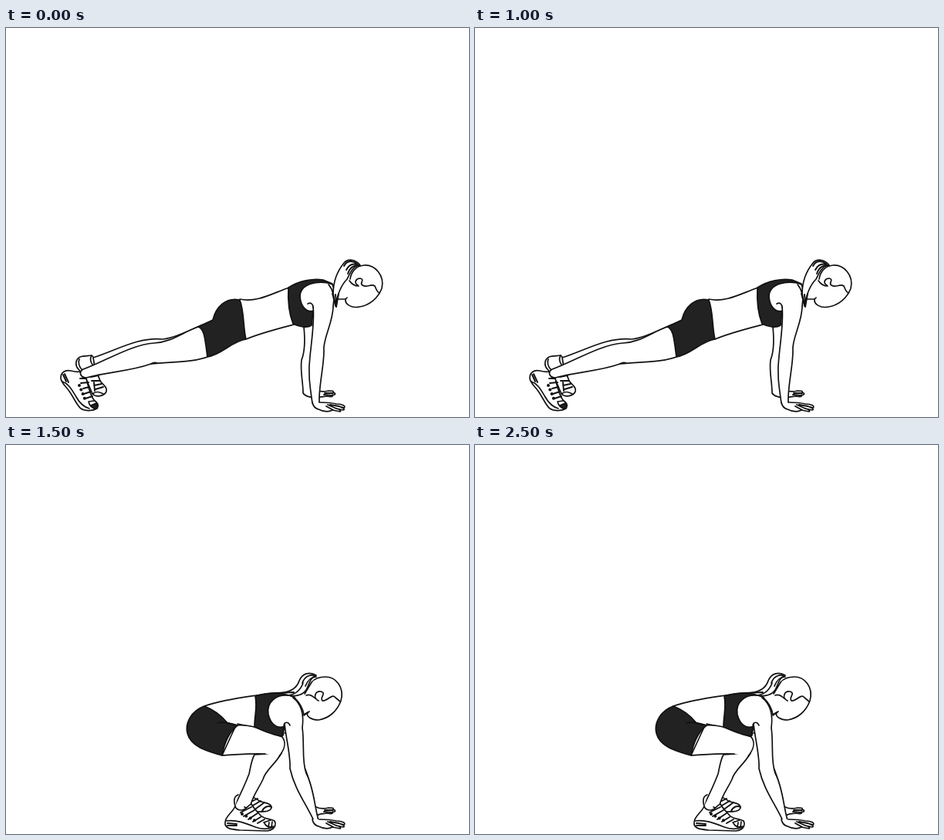
Recreate the animation shown at these times as an HTML page. Size 600 px wide and 505 px high, loop 3000 ms.

```html
<!DOCTYPE html>
<html lang="en">
<head>
<meta charset="utf-8">
<title>Burpee</title>
<style>
  html, body { margin: 0; width: 100%; height: 100%; overflow: hidden; background: #fff; }
  svg { display: block; width: 600px; height: 505px; }
  path { fill: #fff; stroke: #111; stroke-width: 1.7; stroke-linecap: round; stroke-linejoin: round; }
  .k { fill: #222; }
  .l { fill: none; }
  .t { fill: none; stroke-width: 1.9; }
  .dots { fill: none; stroke-width: 4; stroke-dasharray: 0 6; }
  .pose { visibility: hidden; }
</style>
</head>
<body>
<svg viewBox="0 0 600 505">
  <defs>
    <g id="hand">
      <path d="M397 486C398 491 401 494 405 495C411 498 418 499 423 496L433 498C435 497 432 495 428 494L437 496C440 495 437 493 431 491L438 493C441 491 436 488 428 488C420 486 414 486 406 486"/>
      <path class="t" d="M417 489L428 494M420 489L431 491M415 491L424 496"/>
    </g>
    <g id="farHand">
      <path d="M402 470C408 473 414 472 418 471C422 471 425 471 424 473C428 474 427 477 423 476C425 479 421 479 416 478C411 479 406 478 403 481"/>
      <path class="t" d="M413 474L424 474M412 476L422 477"/>
    </g>
    <g id="tiptoe">
      <path d="M84 445C76 443 71 448 71 454C71 461 78 465 83 473C89 482 92 490 97 494C103 498 113 497 118 494C121 489 118 486 114 483C109 477 106 463 104 455C101 455 97 451 96 446C92 447 88 446 84 445Z"/>
      <path class="l" d="M73 459C82 462 86 471 91 479C96 488 101 492 108 494M107 485C108 490 111 493 116 494M107 485L114 484"/>
      <path class="t" d="M74 450L78 459M76 449L81 460M96 455L104 455M97 461L107 460M100 468L108 466M101 475L110 472M103 481L112 478"/>
      <path class="dots" d="M95 464L104 486"/>
      <path class="k" d="M110 490L117 487L119 490L115 495Z"/>
    </g>
    <g id="farTiptoe">
      <path d="M94 443C89 438 90 430 96 427C101 425 107 426 111 425L117 431C116 438 118 449 122 458C125 463 132 466 130 472C127 478 117 480 112 475L104 456Z"/>
      <path class="l" d="M95 430C93 434 95 440 98 443M111 425C108 430 110 434 112 437M112 475C117 471 121 472 126 475"/>
      <path class="t" d="M110 453L120 451M111 458L122 458M114 464L124 462M116 469L126 466M114 460L115 471"/>
    </g>
  </defs>

  <g class="pose" id="plank">
    <use href="#farTiptoe"/>
    <path d="M268 380C243 389 222 402 203 404C171 401 144 418 113 428L115 440L250 400"/>
    <use href="#tiptoe"/>
    <path d="M249 388C229 395 214 408 192 409C162 411 128 433 100 443C94 446 96 454 104 454C133 446 160 446 188 436C212 433 239 435 261 427"/>
    <path class="l" d="M188 436C191 434 193 434 196 435"/>
    <path d="M386 388C388 408 387 421 383 431C381 446 385 459 385 474C388 479 395 480 405 480L408 400"/>
    <use href="#farHand"/>
    <path d="M303 352C325 357 346 344 367 337L373 385C350 391 330 396 311 404"/>
    <path class="k" d="M303 353C285 349 272 362 268 379L249 388C257 390 258 404 261 427C280 424 292 407 311 404C307 388 309 369 303 353Z"/>
    <path d="M367 337C386 327 407 325 423 333C428 344 424 361 421 374L398 386"/>
    <path class="k" d="M366 337C380 328 397 325 411 327L423 332C403 327 381 332 381 349C382 361 389 370 398 367L396 386C390 390 380 388 372 384C367 371 365 354 366 337Z"/>
    <path d="M398 362C400 380 396 406 394 426C391 448 394 466 397 487C400 489 404 488 406 486C405 466 412 440 412 419C410 404 424 383 424 361C426 350 424 340 418 333"/>
    <path class="l" d="M391 358C395 356 398 358 398 363"/>
    <use href="#hand"/>
    <path d="M424 341L430 352L440 352C439 359 448 364 458 362C471 360 482 351 487 338C491 321 478 307 464 308C452 309 447 318 446 326"/>
    <path class="l" d="M445 328C449 334 454 335 457 335M456 334C450 330 454 325 459 325C466 327 457 331 462 334C468 338 473 331 478 335C480 340 481 343 484 344M440 352L442 350"/>
    <path d="M424 345C424 330 429 316 438 305C443 299 453 300 459 308C449 309 446 318 442 326C435 333 430 343 427 361C426 355 425 350 424 345Z"/>
    <path class="t" d="M438 309C442 301 450 302 455 306M441 314C445 306 451 305 458 308M443 319C446 310 451 308 458 308M423 345L428 362L431 345M427 346L428 358"/>
  </g>

  <g class="pose" id="low">
    <use href="#farTiptoe" transform="rotate(10 126 474)"/>
    <path d="M271 430C244 434 224 432 207 427C184 420 151 428 120 429L122 442L270 450"/>
    <use href="#tiptoe" transform="rotate(10 112 491)"/>
    <path d="M271 437C246 440 223 440 210 437C184 427 144 437 106 441C101 444 103 456 110 457C139 462 170 460 198 462C222 471 249 472 275 475"/>
    <path class="l" d="M198 462L205 462"/>
    <path d="M388 429C378 427 373 422 374 415C377 408 386 411 396 414L419 422"/>
    <path d="M336 420C350 428 370 429 388 428L391 475C371 469 349 473 327 469"/>
    <path class="k" d="M271 431L289 429C296 417 310 413 322 414C330 415 335 418 337 420C325 437 329 453 327 469C306 470 297 477 275 475C273 459 276 446 271 431Z"/>
    <path class="l" d="M271 437L288 434C293 432 293 427 300 424"/>
    <path class="k" d="M388 431C398 424 409 421 419 422L450 431L447 463L409 486L391 477C384 466 383 449 385 437Z"/>
    <path d="M397 487C391 473 387 456 388 444C390 435 399 434 412 434C427 429 442 431 449 434L446 462C436 456 425 463 413 459C407 462 404 468 405 485"/>
    <path class="l" d="M415 434C423 433 430 434 434 439M414 459C423 462 434 458 444 465"/>
    <use href="#hand"/>
    <path d="M447 440L447 466L463 466C463 476 478 479 490 475C502 473 512 461 511 449C509 431 494 424 481 429"/>
    <path d="M452 466L463 466C462 462 463 458 466 456"/>
    <path class="l" d="M465 440C471 446 476 445 478 449M480 451C473 448 477 442 484 443C491 446 481 448 485 452C491 456 495 446 501 453C504 457 506 461 509 461"/>
    <path d="M445 464C444 448 454 438 463 427C469 418 477 415 483 418C489 424 485 428 477 430C467 434 464 443 456 448C450 454 451 465 447 476C445 473 447 469 445 464Z"/>
    <path class="t" d="M464 430C470 421 477 419 483 420M465 435C471 427 479 424 485 425M466 439C471 433 477 429 485 426M445 460L447 476L452 460M420 422C432 424 440 427 450 431"/>
  </g>

  <g class="pose" id="squat">
    <path d="M318 456C321 459 325 458 328 462C333 465 344 464 344 471C342 477 332 476 325 476L309 470"/>
    <path class="t" d="M318 463L326 459M320 468L330 462M324 472L335 464M332 475C335 469 340 468 344 470"/>
    <path d="M388 421C394 438 399 455 400 471C398 476 402 481 405 480L391 450"/>
    <use href="#farHand"/>
    <path d="M288 362L257 339C280 331 304 328 325 325L340 345L324 367L300 362"/>
    <path d="M297 467C302 457 310 440 315 427C317 418 318 409 322 402L357 400C347 417 337 421 333 434C328 445 321 453 317 467"/>
    <path d="M336 401C318 400 298 402 280 403L298 364C320 362 342 373 358 379C364 387 361 395 354 404"/>
    <path class="k" d="M257 339C240 345 232 361 235 374C239 390 257 397 280 403C283 386 290 372 300 364L287 361C280 352 270 344 257 339Z"/>
    <path class="l" d="M274 361C280 359 288 360 300 364"/>
    <path d="M325 325C347 320 366 321 379 331L383 365L361 374"/>
    <path class="k" d="M323 326C337 322 356 320 380 324L372 326C349 321 337 335 340 350C343 363 352 369 361 365L358 378C346 377 333 371 322 366C322 351 326 341 323 326Z"/>
    <path d="M361 362C363 382 369 403 368 420C374 447 389 466 399 488L405 487C400 471 399 445 389 426C383 410 387 389 384 367C386 352 384 337 372 328"/>
    <path class="l" d="M360 364C361 359 366 359 368 364M359 377L360 367"/>
    <use href="#hand"/>
    <path d="M374 328C380 334 385 343 386 350L391 347C388 353 397 357 405 357C418 355 429 346 434 332C439 314 427 301 414 301C406 301 400 303 396 308L387 323"/>
    <path class="l" d="M386 351L393 346M389 325C394 323 397 326 401 329M405 332C397 328 401 319 408 320C416 322 406 328 410 332C417 333 422 322 427 328L433 333"/>
    <path d="M350 322C368 322 377 316 380 306C384 296 394 294 402 299C393 303 393 311 389 318C383 327 370 327 360 323Z"/>
    <path class="l" d="M365 325C376 324 382 317 385 309M384 309C387 300 395 297 401 300M388 313C391 305 395 301 402 301"/>
    <path class="t" d="M350 322L373 321"/>
    <path d="M301 454C295 456 295 463 297 469C293 478 284 482 284 490C283 498 292 499 303 500L338 501C347 500 351 494 348 488C342 485 335 486 330 481C325 475 321 472 318 466C313 468 311 474 305 474C300 474 298 472 297 469"/>
    <path class="l" d="M285 488C300 486 313 492 323 496C331 499 340 499 347 496M335 491C337 495 341 497 347 495M334 490L343 487"/>
    <path class="t" d="M287 491L299 492M287 494L299 494M304 477L318 470M308 482L322 474M314 486L326 478M320 489L330 483M326 491L335 486"/>
    <path class="dots" d="M306 479L327 490"/>
    <path class="l" d="M341 490L340 496M345 489L344 496"/>
  </g>

  <g class="pose" id="jump">
    <path d="M297 412C293 406 299 402 304 399L310 393L332 400C334 408 338 416 343 426C349 432 347 440 342 440L327 430"/>
    <path class="t" d="M299 404L303 408M329 408L335 406M331 413L337 412M334 419L340 417M336 425L342 423M339 432L345 431"/>
    <path d="M301 253C303 273 311 291 309 308C300 324 302 341 304 356C307 376 310 395 311 415L327 410C325 383 329 352 330 323C337 318 338 307 338 298C339 280 343 266 342 249"/>
    <path class="l" d="M309 308L309 303M330 323L333 320M326 391C328 396 329 400 328 408"/>
    <path d="M311 412C304 402 296 409 290 416C291 423 300 430 307 436C317 447 328 460 342 459C347 458 349 455 345 449C338 442 333 427 329 408C325 409 324 415 319 415C315 416 313 414 311 412Z"/>
    <path class="l" d="M292 414C304 422 311 431 318 440C327 451 334 455 345 455M335 448C336 452 340 455 345 454M334 447L341 444"/>
    <path class="t" d="M293 417L301 425M295 415L303 423M319 418L328 412M320 423L330 417M322 429L333 423M325 435L335 429M329 441L338 437"/>
    <path class="dots" d="M321 422L331 444"/>
    <path class="k" d="M338 452L344 449L347 453L344 457Z"/>
    <path d="M403 52C395 51 390 46 389 41C390 36 392 39 395 43L392 34C393 29 396 30 398 36L401 43L410 52"/>
    <path class="l" d="M395 43L399 48M398 36C397 32 399 30 401 35"/>
    <path d="M358 99C372 100 387 105 400 98L412 82C410 95 404 107 400 117C387 120 374 116 361 112"/>
    <path d="M314 72C305 79 304 94 305 106C306 121 307 132 308 139C308 155 304 170 297 182L343 199C351 180 351 157 356 134L355 90L340 70Z"/>
    <path class="k" d="M305 105C318 115 341 109 345 97L352 97L362 113C366 123 363 134 355 135C340 129 321 134 308 139C306 128 305 115 305 105Z"/>
    <path class="k" d="M297 182C286 196 285 218 298 233L301 253C314 245 330 247 342 249C342 235 338 226 340 211L343 199C325 196 312 182 297 182Z"/>
    <path d="M321 28C319 40 323 46 323 54C324 62 320 69 314 71L328 74L354 73L352 69C363 63 369 44 366 29C362 14 350 9 339 11C328 12 322 19 321 28Z"/>
    <path class="l" d="M322 52C326 46 331 49 334 51M338 48C330 47 331 34 338 34C344 35 340 39 341 42C347 40 346 27 353 26C357 27 361 28 365 25M351 69L346 67"/>
    <path d="M320 22C308 17 299 29 294 39C286 52 277 63 268 74C286 71 305 65 311 50C314 39 317 32 321 27Z"/>
    <path class="t" d="M268 74C287 59 293 35 317 24M279 69C292 61 297 55 302 44M301 45C304 34 311 27 319 25M306 41C309 34 313 29 320 27"/>
    <path d="M323 69C335 66 345 70 354 74C367 77 378 81 389 81C395 71 403 62 406 48L402 42C398 37 396 27 401 22C404 18 407 20 408 23C410 18 414 18 414 22C418 18 421 21 420 26C424 30 423 35 425 41C419 58 414 75 408 89C404 100 392 102 380 100C364 96 349 97 332 95"/>
    <path class="l" d="M402 31C405 36 410 36 412 34M408 23L409 27M414 22L415 27M406 48C408 46 411 46 412 48M332 100C334 95 339 94 344 95"/>
    <path class="t" d="M311 73C318 68 325 68 330 70M318 69L327 68M345 96L355 100L360 111"/>
  </g>
</svg>
<script>
  const step = 500;
  const order = ["plank", "low", "plank", "squat", "jump", "squat"];

  for (const pose of document.querySelectorAll(".pose")) {
    const frames = order.map((name, i) => ({
      visibility: name === pose.id ? "visible" : "hidden",
      offset: i / order.length,
      easing: "steps(1, end)"
    }));
    frames.push({ ...frames[0], offset: 1 });
    pose.animate(frames, { duration: step * order.length, iterations: Infinity }).startTime = 0;
  }
</script>
</body>
</html>
```
